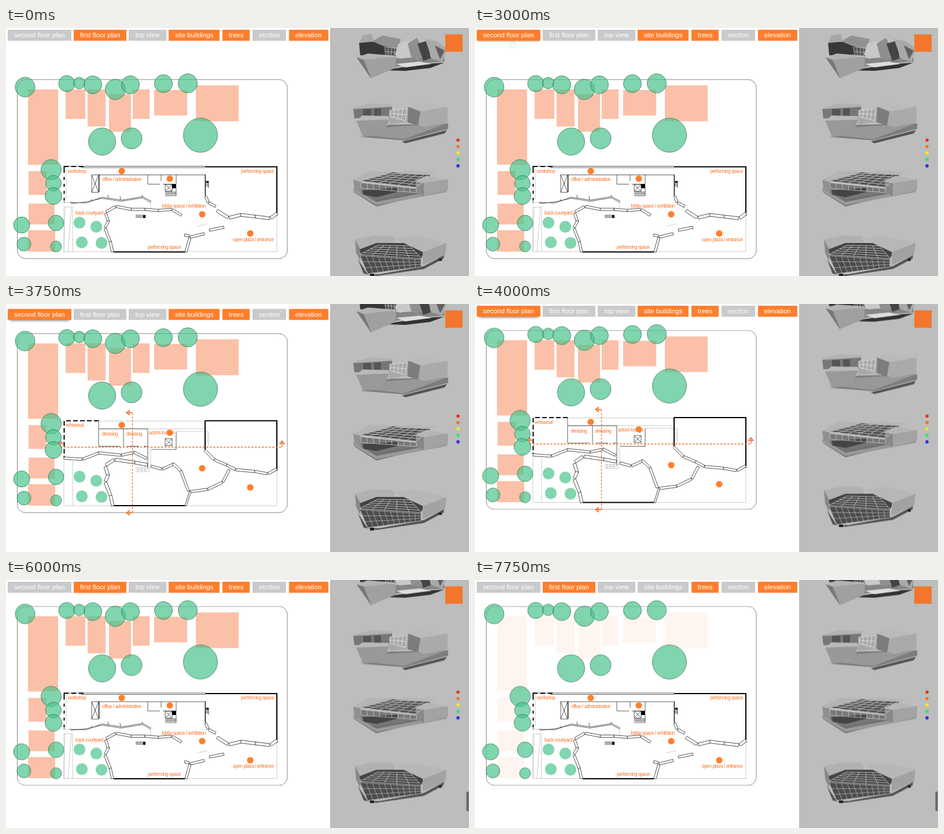
An HTML page that plays this animation: 800 px wide and 428 px high, repeating every 8000 ms.

```html
<!DOCTYPE html>
<html lang="en">
<head>
<meta charset="utf-8">
<title>Floor plan viewer</title>
<style>
  html, body { margin: 0; width: 100%; height: 100%; overflow: hidden; background: #fff; }
  #stage { position: relative; width: 800px; height: 428px; overflow: hidden; background: #fff; }
  svg { position: absolute; left: 0; top: 0; overflow: visible; }
  #stage *, #stage { --orange: #ff7f2c; --grey: #c9cacb; }
  .t { animation: 8s step-end infinite; }
  .panel { position: absolute; left: 560px; top: 0; width: 240px; height: 428px; background: #bcbdbc; }

  #page { animation-name: scroll; }
  #upper { animation-name: upper; }
  #lower { animation-name: lower; }
  #site { animation-name: site; }
  #bar { position: absolute; left: 3px; top: 3px; display: flex; gap: 4.4px; animation-name: bar; }
  #bar span {
    height: 18.5px; padding: 0 11px; background: var(--orange); color: #fff; white-space: nowrap;
    font: 11.5px/18.5px "Liberation Sans", Arial, sans-serif;
  }
  #bar .off { background: var(--grey); }
  #second { animation-name: second, hover2; }
  #first { animation-name: first, hover1; }
  #sites { animation-name: sites, hover3; }
  #dot { animation-name: dot; }
  #ring { animation-name: ring; }
  #thumb { animation-name: thumb; }

  @keyframes scroll {
    0% { transform: none; }
    43.75% { transform: translateY(-8px); }
    46.875% { transform: translateY(-38px); }
    50%, 100% { transform: translateY(-43.5px); }
  }
  @keyframes bar {
    0%, 50%, 100% { transform: none; }
    43.75% { transform: translateY(36px); }
    46.875% { transform: translateY(5.5px); }
  }
  @keyframes lower {
    0%, 75%, 100% { opacity: 1; }
    40.625% { opacity: .5; }
    43.75% { opacity: 0; }
    68.75% { opacity: .15; }
    71.875% { opacity: .75; }
  }
  @keyframes upper {
    0%, 75%, 100% { opacity: 0; }
    40.625% { opacity: .5; }
    43.75% { opacity: 1; }
    71.875% { opacity: .4; }
  }
  @keyframes site {
    0% { opacity: 1; }
    93.75% { opacity: .55; }
    96.875%, 100% { opacity: .17; }
  }
  @keyframes second {
    0%, 65.625%, 100% { background-color: var(--grey); }
    34.375% { background-color: var(--orange); }
  }
  @keyframes first {
    0%, 65.625%, 100% { background-color: var(--orange); }
    34.375% { background-color: var(--grey); }
  }
  @keyframes sites {
    0% { background-color: var(--orange); }
    90.625%, 100% { background-color: var(--grey); }
  }
  @keyframes hover2 {
    0%, 56.25%, 100% { box-shadow: none; }
    25% { box-shadow: 0 3px 3px -2px #0005; }
    43.75% { box-shadow: 0 5px 4px -4px #0008; }
  }
  @keyframes hover1 {
    0%, 81.25%, 100% { box-shadow: none; }
    62.5% { box-shadow: 0 3px 3px -2px #ff7f2c66; }
  }
  @keyframes hover3 {
    0%, 96.875%, 100% { box-shadow: none; }
    87.5% { box-shadow: 0 3px 3px -2px #0005; }
  }
  @keyframes dot {
    0% { transform: translate(75px, -9px); }
    9.375% { transform: translate(74.5px, 0); }
    12.5% { transform: translate(73px, 8px); }
    15.625% { transform: translate(71px, 14px); }
    18.75% { transform: translate(69.5px, 18px); }
    21.875% { transform: translate(68.5px, 19px); }
    25% { transform: translate(67px, 18px); }
    56.25% { transform: translate(92px, 16px); }
    59.375% { transform: translate(130px, 16px); }
    62.5% { transform: translate(150px, 17px); }
    81.25% { transform: translate(195px, 16px); }
    84.375% { transform: translate(262px, 16px); }
    87.5%, 100% { transform: translate(303px, 17px); }
  }
  @keyframes ring {
    0%, 40.625%, 71.875%, 93.75%, 100% { opacity: 0; }
    34.375% { opacity: .45; transform: translate(65px, 29.5px); }
    65.625% { opacity: .6; transform: translate(150px, 26px); }
    87.5% { opacity: .8; transform: translate(303px, 28px); }
  }
  @keyframes thumb {
    0% { opacity: 0; }
    68.75% { opacity: .4; }
    71.875%, 100% { opacity: 1; }
  }
  text { font: 8.2px "Liberation Sans", Arial, sans-serif; letter-spacing: -.4px; fill: #fa7126; }
  .line { fill: none; stroke: #333; stroke-width: .8; }
  .soft { fill: none; stroke: #aaa; stroke-width: .6; }
  .bold { fill: none; stroke: #000; stroke-width: 2; }
  .cut { fill: none; stroke: #f26a2b; stroke-width: 1.3; }
</style>
</head>
<body>
<div id="stage">
  <div class="panel"></div>
  <svg width="800" height="428">
    <g id="page" class="t">
      <rect x="19.5" y="89" width="466.5" height="309" rx="14" fill="none" stroke="#666" stroke-width=".8"/>
      <g id="site" class="t" fill="#fbc0a8"></g>

      <g id="lower" class="t">
        <path class="soft" d="M100 309V386H468V324M115 309V386M100 309H115M102 309L100 386M113 309L107 386M115 301H100M104 242V296M250 298V312M330 342L348 338M352 296L362 312"/>
        <path class="line" d="M100 238.500H344M130 241H344M160 253.500H344V290M148 253.500H160V283.500H148ZL160 283.500M160 253.500L148 283.500M245 253.500V269.500H266M271 269.500H294V253.500M268 253.500V264M275 270H287V281.500H275ZL287 281.500M287 270L275 281.500"/>
        <path class="line" d="M275 283H294M275 285H294M275 287H294M275 289.500H294V276M345 265H350M345 267H350M345 269H350M345 271H350M345 273H350M350 264V276M224 323H240M224 325H240M224 327H240V322"/>
        <path class="line" d="M110 301L138 302L166 292L200 297L236 291L251 299M112 303L139 300L166 294L199 299L236 293L250 301M149 299L147 295M177 294L176 288M198 297L197 290M236 291L235 288"/>
        <path class="bold" d="M344 239.500H468V324M186 386.500H309M100.500 238V301" stroke-dasharray="none"/>
        <path d="M100.500 250V300" stroke="#fff" stroke-width="3" stroke-dasharray="7 5"/>
        <path d="M100 239H134" stroke="#000" stroke-width="2" stroke-dasharray="8 5"/>
        <path d="M161 253V283M344.500 253V290" stroke="#000"/>
        <path d="M287 269.500h7v7h-7zM237 323h4v5h-4zM346 264h4v3h-4z"/>
        <g id="lowerWalls"></g><g id="lowerText"></g>
      </g>

      <g id="upper" class="t">
        <path class="soft" d="M100 309V386H468V326M115 309V386M160 240H344M160 253.500H344M250 289V318M294 258H350V284M344 262H350M344 266H350M344 270H350M344 274H350M344 278H350M224 321H250M224 324H250M224 327H250M228 318V329M234 318V329M240 318V329"/>
        <path class="line" d="M160 240V283.500M160 253.500H245V283.500H238M160 283.500H197M203 253.500V283.500M209 283.500H230M275 270.500H287V282.500H275ZL287 282.500M287 270.500L275 282.500M251 289H294V258M245 284V322"/>
        <path class="bold" d="M344 239.500H468V326M186 386H309M344 239V289" />
        <path class="bold" d="M160 239.500H100.500V302" stroke-dasharray="8 4"/>
        <g id="upperWalls"></g>
        <path class="cut" stroke-dasharray="3.500 2.500" d="M94 285H477M218.500 226V398"/>
        <path class="cut" d="M94 285V274M90 279L94 274L98 279ZM477 285V274M473 279L477 274L481 279ZM218.500 225.500H208M213 221.500L208 225.500L213 229.500ZM218.500 398.500H208M213 394.500L208 398.500L213 402.500Z"/>
        <g id="upperText"></g>
      </g>

      <g id="trees" fill="#4ac48c" fill-opacity=".7"></g>
      <g id="spots" fill="#ff7f2c"></g>

      <g id="model1">
        <path fill="#333" d="M650 73L690 67L738 61L757 60L733 69L690 74Z"/>
        <path fill="#858585" d="M660 70L672 52L757 50L758 58L700 62Z"/>
        <path fill="#ddd" d="M674 62L715 58L735 62L690 68Z"/>
        <path fill="#383838" d="M610 25L648 23L678 30L672 50L612 47Z"/>
        <path fill="#a7a7a7" d="M616 13L632 10L636 23L610 26Z"/>
        <path fill="#929292" d="M633 23L650 13L682 19L677 37L652 31Z"/>
        <path fill="#555" d="M654 34L676 36L674 50L656 48Z"/>
        <path fill="#c9c9c9" d="M678 27L697 22L701 50L680 53L672 46Z"/>
        <path fill="#8f8f8f" d="M694 27L710 17L724 43L712 56L700 50Z"/>
        <path fill="#444" d="M711 27L728 22L734 52L721 57Z"/>
        <path fill="#a9a9a9" d="M724 19L745 23L762 36L754 58L736 53Z"/>
        <path fill="#606060" d="M741 30L758 39L750 54Z"/>
        <path fill="#b3b3b3" d="M606 51L625 44L674 48L668 53L618 55Z"/>
        <path fill="#a0a0a0" d="M606 51L618 55L674 49L673 69L630 87Z"/>
        <path fill="#777" d="M606 51L618 55L631 87Z"/>
      </g>

      <g id="model2">
        <path fill="#7d7d7d" d="M620 187L661 167L764 165V174L688 194L612 188Z"/>
        <path fill="#555" d="M684 196L762 176L758 182L690 199Z"/>
        <path fill="#989898" d="M612 184L660 171L763 164L688 192Z"/>
        <path fill="#b2b2b2" d="M600 138L630 130L668 132L667 139L601 141Z"/>
        <path fill="#777" d="M600 140L667 136V154L602 156Z"/>
        <path fill="#555" d="M617 140h14v12h-14zM636 139h12v13h-12z"/>
        <path fill="#a8a8a8" d="M662 142L697 137L695 162L662 166Z"/>
        <path fill="#b9b9b9" d="M605 160L616 151L661 152L663 159L620 164Z"/>
        <path fill="#999" d="M605 160L662 158L652 184L617 188Z"/>
        <path fill="#bababa" d="M695 136L709 128L763 137L716 145Z"/>
        <path fill="#aaa" d="M695 136L716 144L763 136V163L722 171L709 166Z"/>
        <path fill="#7c7c7c" d="M695 136L716 144L712 168L694 163Z"/>
      </g>

      <g id="model3">
        <path fill="#6f6f6f" d="M600 279L707 277L764 278L640 308L602 284Z"/>
        <path fill="#999" d="M600 276L640 300L762 277V283L640 306L600 282Z"/>
        <path fill="#b4b4b4" d="M600 262L629 247L668 248L672 255L612 265Z"/>
        <path fill="#909090" d="M600 262L614 266V284L602 278Z"/>
        <path fill="#505050" d="M612 264L668 249L736 252L710 275Z"/>
        <path fill="#b6b6b6" d="M670 250L697 246L744 249L735 254Z"/>
        <path fill="#777" d="M613 267L709 277V284L640 296L614 286Z"/>
        <path fill="#444" d="M616 280L676 276V283L640 292L618 288Z"/>
        <path fill="#b5b5b5" d="M707 264L727 255L764 262L722 269Z"/>
        <path fill="#a3a3a3" d="M708 264L722 268L764 261V279L722 290L708 284Z"/>
        <path fill="#888" d="M708 264L722 268V290L708 284Z"/>
      </g>

      <g id="model4">
        <path fill="#555" d="M608 399L625 425L645 425L722 411L757 392L756 398L722 416L640 428L618 424Z"/>
        <path fill="#b1b1b1" d="M603 365L635 358L669 359L673 374L612 384Z"/>
        <path fill="#888" d="M603 365L613 383L612 402L605 388Z"/>
        <path fill="#444" d="M611 382L640 371L690 371L722 387L716 401L614 394Z"/>
        <path fill="#b7b7b7" d="M670 363L710 359L761 371L721 387Z"/>
        <path fill="#a2a2a2" d="M720 387L761 371L759 391L720 409Z"/>
        <path fill="#4c4c4c" d="M611 392L717 400V412L625 424Z"/>
        <path fill="#222" d="M629 424h7v5h-7zM748 398h5v4h-5z"/>
      </g>
    </g>

    <rect x="759" y="11" width="30" height="30" fill="#f3762c"/>
    <g id="legend"></g>
    <rect id="thumb" class="t" x="795.500" y="365" width="4" height="34" rx="2" fill="#666"/>
    <circle id="ring" class="t" r="5" fill="none" stroke="#f3a27a"/>
    <circle id="dot" class="t" r="4.500" fill="#fbae85"/>
  </svg>
  <div id="bar" class="t">
    <span id="second" class="t off">second floor plan</span>
    <span id="first" class="t">first floor plan</span>
    <span class="off">top view</span>
    <span id="sites" class="t">site buildings</span>
    <span>trees</span>
    <span class="off">section</span>
    <span>elevation</span>
  </div>
</div>
<script>
  const add = (id, tag, attrs, text = '') => {
    const el = document.createElementNS('http://www.w3.org/2000/svg', tag);
    for (const k in attrs) el.setAttribute(k, attrs[k]);
    el.textContent = text;
    document.getElementById(id).append(el);
  };
  const circle = (id, cx, cy, r, more) => add(id, 'circle', { cx, cy, r, ...more });

  [[38, 106, 52, 130], [103, 106, 34, 51], [141, 106, 31, 64], [178, 114, 38, 65], [219, 106, 29, 51],
   [256, 107, 57, 44], [328, 99, 74, 62], [39, 247, 31, 41], [39, 303, 45, 36], [38, 349, 47, 37]]
    .forEach(([x, y, width, height]) => add('site', 'rect', { x, y, width, height }));

  const outline = { stroke: '#32674c', 'stroke-width': .7 };
  [[33, 102, 17], [105, 96, 14], [126.5, 95, 10], [150, 98, 15.5], [189, 106, 17.5], [215, 98, 15.5],
   [272, 96, 15.5], [314, 95.5, 16.5], [166, 196, 23.5], [217, 190.5, 18], [336, 185, 29.5],
   [78, 244.5, 17.5], [82, 268, 13.5], [82, 290, 14.5], [27, 340, 14], [86.5, 336.5, 13.5],
   [31, 373, 12], [86.5, 377, 9.5]]
    .forEach(([x, y, r]) => circle('trees', x, y, r, outline));
  [[127, 336], [156, 343], [131, 370], [165, 371]].forEach(([x, y]) => circle('trees', x, y, 10.2));
  [[200, 247], [283, 260], [339, 321.5], [422, 354.5]].forEach(([x, y]) => circle('spots', x, y, 5.6));
  ['#e8301f', '#f3762c', '#f5e52c', '#2fe477', '#2f2fe0']
    .forEach((fill, i) => circle('legend', 781, 193.5 + i * 11.1, 2.8, { fill }));

  const labels = (id, list) => list.forEach(([x, y, s]) => add(id, 'text', { x, y }, s));
  labels('lowerText', [
    [106.5, 249.5, 'workshop'], [166, 264, 'office / administrative'], [406, 249.5, 'performing space'],
    [269.5, 310, 'lobby space / exhibition'], [120, 322, 'back courtyard'],
    [245, 381, 'performing space'], [392, 367.5, 'open plaza / entrance']]);
  labels('upperText', [
    [103.5, 250, 'rehearsal'], [165.5, 265, 'dressing'], [207.5, 265, 'dressing'], [247, 263, 'actors lounge']]);

  // Folded wall: one thin outlined panel per segment.
  const wall = (id, w, ...p) => {
    for (let i = 0; i + 3 < p.length; i += 2) {
      const [x, y, u, v] = p.slice(i, i + 4), len = Math.hypot(u - x, v - y);
      const dx = (y - v) / len * w, dy = (u - x) / len * w;
      add(id, 'path', {
        d: `M${x} ${y}L${u} ${v}L${u + dx} ${v + dy}L${x + dx} ${y + dy}Z`,
        fill: '#fff', stroke: '#222', 'stroke-width': .8
      });
    }
  };
  wall('lowerWalls', 4, 302, 325, 286, 315, 263, 317, 240, 315, 216, 315, 190, 310, 174, 319, 179, 334, 173, 345, 182, 368, 186, 386);
  wall('lowerWalls', 4, 309, 386, 316, 361, 308, 359);
  wall('lowerWalls', 4, 347, 290, 351, 300, 363, 306);
  wall('lowerWalls', 5, 366, 313, 385, 325, 406, 320, 431, 323, 456, 326, 467, 318);
  wall('lowerWalls', 4, 318, 359, 342, 353);
  wall('lowerWalls', 4, 351, 347, 376, 342);
  wall('upperWalls', 4, 100, 302, 132, 304, 160, 293, 199, 297, 222, 292, 244, 303);
  wall('upperWalls', 5, 244, 318, 222, 314, 188, 309, 174, 318, 179, 334, 174, 345, 183, 368, 187, 386);
  wall('upperWalls', 4, 251, 316, 270, 321, 290, 312, 304, 325, 317, 360, 348, 356, 373, 344, 384, 323);
  wall('upperWalls', 4, 345, 289, 361, 305, 382, 314, 397, 322, 430, 325, 452, 329, 467, 321);
  wall('upperWalls', 3, 309, 386, 317, 361);

  // Mesh of nx by ny cells spanned over four corners.
  const mesh = (id, q, nx, ny, stroke, width) => {
    const at = (u, v) => [0, 1].map(k =>
      (q[k] * (1 - u) + q[2 + k] * u) * (1 - v) + (q[6 + k] * (1 - u) + q[4 + k] * u) * v).join(' ');
    let d = '';
    for (let i = 0; i <= nx; i++) d += `M${at(i / nx, 0)}L${at(i / nx, 1)}`;
    for (let j = 0; j <= ny; j++) d += `M${at(0, j / ny)}L${at(1, j / ny)}`;
    add(id, 'path', { d, fill: 'none', stroke, 'stroke-width': width });
  };
  mesh('model1', [654, 33, 678, 35, 675, 50, 656, 48], 4, 2, '#ccc', .7);
  mesh('model2', [664, 142, 693, 139, 690, 160, 664, 153], 4, 2, '#eee', .8);
  mesh('model3', [612, 264, 662, 251, 735, 253, 709, 275], 5, 6, '#bbb', 1);
  mesh('model3', [613, 267, 709, 277, 709, 284, 614, 277], 9, 1, '#ccc', .8);
  mesh('model4', [611, 391, 642, 375, 698, 376, 718, 398], 5, 5, '#bbb', 1);
  mesh('model4', [612, 393, 717, 400, 717, 412, 625, 424], 10, 3, '#b5b5b5', .8);
</script>
</body>
</html>
```
